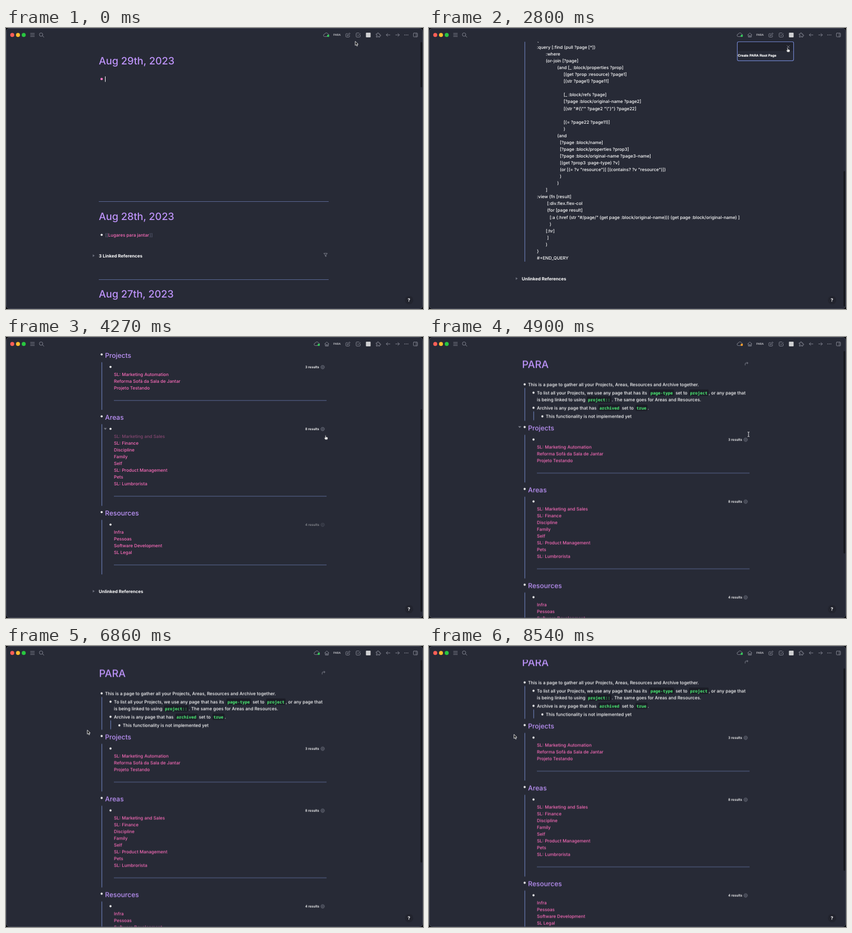
Write an HTML page that moves like this. It is 800 px wide and 540 px high and loops after 8610 ms.

```html
<!DOCTYPE html>
<html lang="en">
<head>
<meta charset="utf-8">
<title>PARA page walkthrough</title>
<style>
html, body { margin: 0; width: 100%; height: 100%; overflow: hidden; background: #08090c; }
svg { display: block; width: 800px; height: 540px; }
text { font: 500 8.5px Inter, sans-serif; fill: #fff; white-space: pre; text-rendering: geometricPrecision; }
.title { font-size: 19.45px; fill: #bd93f9; }
.head { font-size: 12.9px; fill: #bd93f9; }
.link { fill: #fb6cba; }
.query { font-size: 8.43px; }
.faint { fill: #5d6078; }
.bold { font-weight: 700; font-size: 8.45px; }
.count { font-size: 6.42px; font-weight: 600; }
.tool { font-size: 5.4px; fill: #d8d8dc; }
.action { font: bold 6.5px "Liberation Sans", Arial, sans-serif; stroke: #fff; stroke-width: .2; }
.code { font: 700 7.95px "Noto Sans Mono", monospace; fill: #50fa7b; }
.help { font-weight: 700; font-size: 9px; }
.rule { stroke: #6272a4; stroke-width: .9; }
.guide { stroke: #6272a4; stroke-width: 1.4; }
.icon { fill: none; stroke: #8b8d99; stroke-width: .9; stroke-linecap: round; stroke-linejoin: round; }
.gear { fill: none; stroke: #777a88; stroke-width: .8; }
.thumb { fill: #15161c; }
.bullet { fill: #fff; }

/* Hard switches */
.journal, .blank, .raw, .page, .edit, .idle, .popup, .cloud, .home, .pending,
.dim, .foldA, .foldP, .arrow, .hand, .beam { animation: 8610ms step-end infinite; }
.journal { animation-name: journal; }
.blank { animation-name: blank; }
.raw { animation-name: raw; }
.page { animation-name: page; }
.edit { animation-name: edit; }
.idle { animation-name: idle; }
.popup { animation-name: popup; }
.cloud { animation-name: cloud; }
.home { animation-name: home; }
.pending { animation-name: pending; }
.dim { animation-name: dim; }
.foldA { animation-name: foldA; }
.foldP { animation-name: foldP; }
.arrow { animation-name: arrow; }
.hand { animation-name: hand; }
.beam { animation-name: beam; }
@keyframes journal { 20.3%, to { opacity: 0 } }
@keyframes blank { 0% { opacity: 0 } 20.3% { opacity: 1 } 25%, to { opacity: 0 } }
@keyframes raw { 0% { opacity: 0 } 25% { opacity: 1 } 36.6%, to { opacity: 0 } }
@keyframes page { 0% { opacity: 0 } 36.6%, to { opacity: 1 } }
@keyframes edit { 9.8%, to { opacity: 0 } }
@keyframes idle { 0% { opacity: 0 } 9.8%, to { opacity: 1 } }
@keyframes popup { 0% { opacity: 0 } 9.8% { opacity: 1 } 33.9%, to { opacity: 0 } }
@keyframes cloud { 0% { transform: translateX(18px) } 20.3%, to { transform: none } }
@keyframes home { 0% { opacity: 0 } 20.3%, to { opacity: 1 } }
@keyframes pending { 0% { fill: #34c759 } 53% { fill: #ff9f2e } 66%, to { fill: #34c759 } }
@keyframes dim { 48.5% { opacity: .45 } 50.6%, to { opacity: 1 } }
@keyframes foldA { 0% { opacity: 0 } 45% { opacity: 1 } 51%, to { opacity: 0 } }
@keyframes foldP { 0% { opacity: 0 } 54.5% { opacity: 1 } 62%, to { opacity: 0 } }
@keyframes arrow {
  0% { opacity: 1 } 6% { opacity: 0 } 10.8% { opacity: 1 } 13.5% { opacity: 0 } 23% { opacity: 1 }
  30% { opacity: 0 } 35% { opacity: 1 } 45% { opacity: 0 } 62%, to { opacity: 1 }
}
@keyframes hand {
  0% { opacity: 0 } 6% { opacity: 1 } 10.8% { opacity: 0 } 13.5% { opacity: 1 } 23% { opacity: 0 }
  30% { opacity: 1 } 35% { opacity: 0 } 45% { opacity: 1 } 52%, to { opacity: 0 }
}
@keyframes beam { 0% { opacity: 0 } 52% { opacity: 1 } 62%, to { opacity: 0 } }

/* Smooth motion */
.scroll { animation: scroll 8610ms ease-in-out infinite; }
.slide { animation: slide 8610ms ease-in-out infinite; }
.pointer { animation: pointer 8610ms ease-in-out infinite; }
@keyframes scroll {
  0%, 49.7% { transform: translateY(-139.5px) }
  55.8%, 97.4% { transform: translateY(0) }
  99.1%, to { transform: translateY(-21px) }
}
@keyframes slide {
  0%, 49.7% { transform: translateY(112px) }
  55.8%, 97.4% { transform: translateY(0) }
  99.1%, to { transform: translateY(16px) }
}
@keyframes pointer {
  0%, 2.5% { transform: translate(670px, 25.5px) }
  7.5%, 10.5% { transform: translate(634px, 13px) }
  15.9%, 22% { transform: translate(629px, 50.5px) }
  31.5%, 34.5% { transform: translate(688px, 37.5px) }
  46%, 50% { transform: translate(613px, 188.5px) }
  56%, 62% { transform: translate(613px, 187px) }
  74%, 93% { transform: translate(156px, 161.5px) }
  99%, to { transform: translate(163px, 169.7px) }
}
</style>
</head>
<body>
<svg id="stage" viewBox="0 0 800 540"></svg>
<script>
const esc = s => s.replace(/&/g, '&amp;').replace(/</g, '&lt;');
const text = (x, y, s, cls = '') => `<text x="${x}" y="${y}" class="${cls}">${esc(s)}</text>`;
const group = (cls, ...parts) => `<g class="${cls}">${parts.join('')}</g>`;
const path = (d, cls = 'icon') => `<path d="${d}" class="${cls}"/>`;
const dot = (x, y, r, fill) => `<circle cx="${x}" cy="${y}" r="${r}" fill="${fill}"/>`;
const bullet = (x, y) => `<circle cx="${x}" cy="${y}" r="2" class="bullet"/>`;
const guide = (x, y1, y2) => path(`M${x} ${y1}V${y2}`, 'guide');
const rule = (x1, x2, y) => path(`M${x1} ${y}H${x2}`, 'rule');
const thumb = (y, h) => `<rect x="795.3" y="${y}" width="3.2" height="${h}" rx="1.6" class="thumb"/>`;
const folded = y => `<path d="M166.5 ${y - 2.5}l3.6 2.5l-3.6 2.5z" fill="#6d707e"/>`;
const open = (x, y, cls) => `<path d="M${x - 3} ${y - 1.6}h6l-3 3.4z" fill="#7d808c" class="${cls}"/>`;
const chip = (x, y, s) =>
  `<rect x="${x - 2}" y="${y - 9}" width="${s.length * 4.77 + 4}" height="12" rx="2" fill="#1b1d26"/>` + text(x, y, s, 'code');
const gear = (x, y) =>
  `<g class="gear"><circle cx="${x}" cy="${y}" r="3.6" stroke-dasharray="1.4"/>` +
  `<circle cx="${x}" cy="${y}" r="3"/><circle cx="${x}" cy="${y}" r="1.1"/></g>`;

const LINE = 13.06;

function journal() {
  return group('journal',
    text(178, 70, 'Aug 29th, 2023', 'title'),
    group('edit', dot(183.5, 98, 2.3, '#ff79c6'), '<path d="M190.5 93v10.5" stroke="#fff"/>'),
    group('idle', bullet(183.5, 98)),
    rule(178, 619, 333.5),
    text(178, 369, 'Aug 28th, 2023', 'title'),
    bullet(183.5, 397.5),
    text(190.2, 400.5, '[[', 'faint'), text(196, 400.5, 'Lugares para jantar', 'link'), text(275, 400.5, ']]', 'faint'),
    folded(437.5), text(178, 441, '3 Linked References', 'bold'),
    path('M610 433h6.4l-2.4 3.3v3l-1.6-1v-2z'),
    rule(178, 619, 483.5),
    text(178, 518, 'Aug 27th, 2023', 'title'),
    thumb(27, 87));
}

const query = `:query [:find (pull ?page [*])
       :where
       (or-join [?page]
                (and [_ :block/properties ?prop]
                     [(get ?prop :resource) ?page1]
                     [(str ?page1) ?page11]

                     [_ :block/refs ?page]
                     [?page :block/original-name ?page2]
                     [(str "#{\\"" ?page2 "\\"}") ?page22]

                     [(= ?page22 ?page11)]
                     )
                (and
                  [?page :block/name]
                  [?page :block/properties ?prop3]
                  [?page :block/original-name ?page3-name]
                  [(get ?prop3 :page-type) ?v]
                  (or [(= ?v "resource")] [(contains? ?v "resource")])
                  )
                )
       ]
:view (fn [result]
        [:div.flex.flex-col
        (for [page result]
          [:a {:href (str "#/page/" (get page :block/original-name))) (get page :block/original-name) ]
          )
       [:hr]
        ]
       )
}
#+END_QUERY`;

function rawPage() {
  const lines = query.split('\n').map((s, i) => {
    const code = s.trimStart();
    return text(207 + (s.length - code.length) * 2.44, 40 + i * LINE, code, 'query');
  });
  return group('raw', guide(183.8, 20, 449), text(207, 27, '{', 'query'), ...lines,
    folded(481.5), text(178, 484.7, 'Unlinked References', 'bold'), thumb(275, 260));
}

function section(name, y, links, dimLink, dimCount) {
  const last = y + 38 + (links.length - 1) * LINE;
  return bullet(183.5, y) + text(190, y + 6.3, name, 'head') +
    guide(183.8, y + 15, last + 42.5) + bullet(200.5, y + 24) +
    group(dimCount ? 'dim' : '', text(574, y + 26.5, links.length + ' results', 'count'), gear(607.5, y + 24.4)) +
    links.map((s, i) => text(207, y + 41.2 + i * LINE, s, 'link' + (dimLink && !i ? ' dim' : ''))).join('') +
    rule(207, 615, Math.round(last + 24) + .5);
}

function paraPage() {
  return group('page', group('scroll',
    text(178.5, 59, 'PARA', 'title'),
    path('M606.5 54v-2.2q0-1.8 1.8-1.8h3.6m-1.8-1.8l1.8 1.8l-1.8 1.8'),
    bullet(183.5, 91),
    text(190, 94, 'This is a page to gather all your Projects, Areas, Resources and Archive together.'),
    guide(183.8, 98, 161), bullet(200.5, 107),
    text(207, 110, 'To list all your Projects, we use any page that has its'), chip(425, 110, 'page-type'),
    text(473, 110, 'set to'), chip(501, 110, 'project'), text(536.5, 110, ', or any page that'),
    text(207, 123, 'is being linked to using'), chip(305, 123, 'project::'),
    text(350.5, 123, '. The same goes for Areas and Resources.'),
    bullet(200.5, 136),
    text(207, 139, 'Archive is any page that has'), chip(327, 139, 'archived'),
    text(370, 139, 'set to'), chip(398, 139, 'true'), text(419.5, 139, '.'),
    guide(200.8, 143, 160), bullet(217.5, 152.5),
    text(224, 155.5, 'This functionality is not implemented yet'),
    section('Projects', 173, ['SL: Marketing Automation', 'Reforma Sofá da Sala de Jantar', 'Projeto Testando']),
    section('Areas', 292, ['SL: Marketing and Sales', 'SL: Finance', 'Discipline', 'Family', 'Self',
      'SL: Product Management', 'Pets', 'SL: Lumbrorista'], true),
    section('Resources', 476, ['Infra', 'Pessoas', 'Software Development', 'SL Legal'], false, true),
    open(174, 173, 'foldP'), open(190.5, 316, 'foldA'),
    folded(628), text(178, 631.2, 'Unlinked References', 'bold')),
  group('slide', thumb(27, 389)));
}

function toolbar() {
  return '<rect x="1" y="1" width="798" height="25.5" rx="6" fill="#272a36"/>' +
    dot(12, 13.4, 3.8, '#ff5f57') + dot(23, 13.4, 3.8, '#febc2e') + dot(34, 13.4, 3.8, '#28c840') +
    path('M47 10.3h7.5M47 13.3h7.5M47 16.3h7.5') +
    path('M70 15l2.8 2.8M70.6 12.7a3.3 3.3 0 1 1-6.6 0a3.3 3.3 0 1 1 6.6 0') +
    group('cloud', path('M599 16.5h-5.6a2.4 2.4 0 0 1 0-4.8a3.3 3.3 0 0 1 6.2-.3q1.8.2 2 2'),
      '<circle cx="600" cy="15" r="2.2" fill="#34c759" class="pending"/>') +
    group('home', path('M611.5 13.2l4-3.7l4 3.7M612.5 12.6v4.7h6v-4.7M614.5 17v-2.6h2v2.6')) +
    text(628, 15.4, 'PARA', 'tool') +
    path('M655 10.7h-1.5a1.5 1.5 0 0 0-1.5 1.5v3.8a1.5 1.5 0 0 0 1.5 1.5h4a1.5 1.5 0 0 0 1.5-1.5v-1.5M654.8 14.8l.4-1.8l3.6-3.6l1.4 1.4l-3.6 3.6z') +
    path('M679.5 13.2v3q0 1.2-1.2 1.2h-5.4q-1.2 0-1.2-1.2v-5.4q0-1.2 1.2-1.2h4.3M673.8 13l1.8 1.8l4-4.3') +
    '<rect x="690.5" y="9" width="9" height="9" rx="1" fill="#cfd0d2"/>' +
    path('M710.5 11.3h2q-.5-2.2 1.2-2.2t1.2 2.2h2v2q2.2-.5 2.2 1t-2.2 1v2.2h-2q.3-1.8-1-1.8t-1.2 1.8h-2.2v-2.2q1.7.1 1.7-1t-1.7-1z') +
    path('M736.7 13.3h-7.2m2.8-2.8l-2.8 2.8l2.8 2.8M747.5 13.3h7.2m-2.8-2.8l2.8 2.8l-2.8 2.8') +
    [765, 768, 771].map(x => dot(x, 13.3, .85, '#8b8d99')).join('') +
    path('M782.5 9.8h6.2q.8 0 .8.8v5.6q0 .8-.8.8h-6.2q-.8 0-.8-.8v-5.6q0-.8.8-.8zM787 9.8v7.2');
}

const popup = group('popup',
  '<rect x="591.5" y="26.5" width="108" height="36.3" rx="2.5" fill="#272a36"/>',
  '<rect x="592" y="27" width="107" height="17" fill="#20222c"/>',
  '<rect x="591.5" y="26.5" width="108" height="36.3" rx="2.5" fill="none" stroke="#7386d0" stroke-width="1.2"/>',
  path('M686.7 33.7l5 5m0-5l-5 5'),
  text(592.6, 55.3, 'Create PARA Root Page', 'action'));

const pointer = group('pointer',
  '<path class="arrow" d="M0 0v8l1.9-1.7l1.3 2.9l1.3-.6l-1.3-2.8h2.5z" fill="#111" stroke="#fff" stroke-width=".9"/>',
  '<path class="hand" d="M-.8 .8q.8-1.2 1.6 0v2.8l3 .7q.8.3.7 1.2l-.7 3.3h-4.3l-2.3-3.2q-.3-1.2 1-.7l1 .8z" fill="#fff" stroke="#15161c" stroke-width=".6"/>',
  '<path class="beam" d="M-1.8-4.5q1.8 0 1.8 1.2q0-1.2 1.8-1.2M0-3.5v7M-1.8 4.5q1.8 0 1.8-1.2q0 1.2 1.8 1.2" fill="none" stroke="#e8e8ea"/>');

document.getElementById('stage').innerHTML =
  '<rect x=".5" y=".5" width="799" height="539" rx="6" fill="#272a36"/>' +
  journal() + group('blank', text(178.5, 59, 'PARA', 'title'), bullet(183.5, 91)) + rawPage() + paraPage() + toolbar() +
  dot(773.3, 523, 8, '#22242e') + text(770.6, 526.3, '?', 'help') + popup +
  '<rect x=".5" y=".5" width="799" height="539" rx="6" fill="none" stroke="#474a58"/>' + pointer;
</script>
</body>
</html>
```
